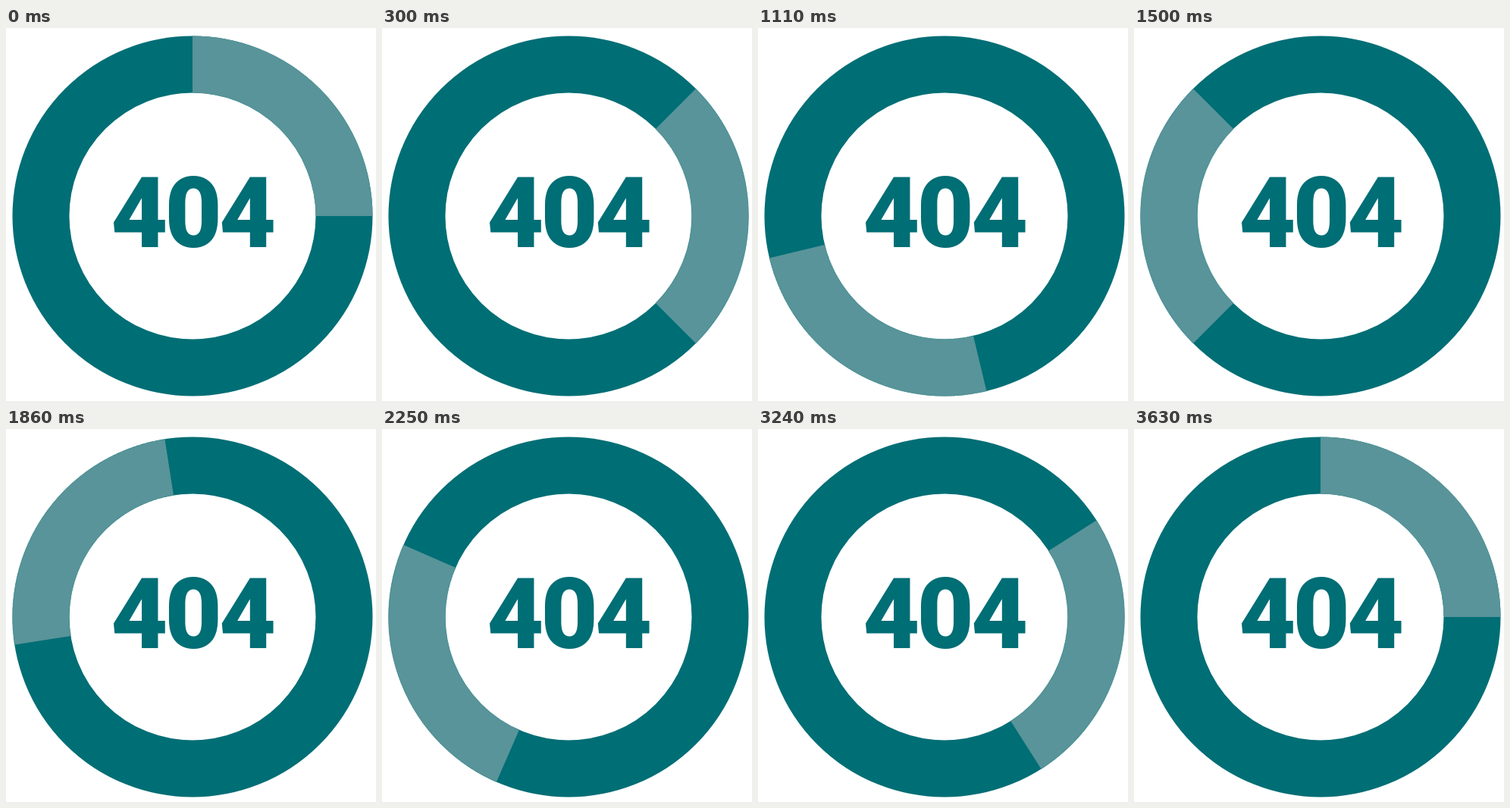
An HTML page that plays this animation: 488x492 px, repeating every 3.66 s.

```html
<!DOCTYPE html>
<html lang="en">
<head>
<meta charset="utf-8">
<title>404</title>
<style>
  html, body { margin: 0; width: 100%; height: 100%; overflow: hidden; background: #fff; }
  svg { display: block; width: 488px; height: 492px; }
  circle { fill: none; stroke: #006e75; stroke-width: 75; }
  .arc {
    stroke: #589499;
    stroke-dasharray: 1 3;
    transform-origin: 246px 248px;
    animation: swing 3660ms -4ms infinite;
  }
  text {
    font: 900 130px Roboto, sans-serif;
    letter-spacing: -4px;
    text-anchor: middle;
    fill: #006e75;
  }
  /* 60 ticks out, 61 ticks back, one tick of rest; 30 ms each */
  @keyframes swing {
    0% { transform: rotate(-90deg); animation-timing-function: steps(60); }
    49.18033% { transform: rotate(180deg); animation-timing-function: steps(61); }
    99.18033%, 100% { transform: rotate(-90deg); }
  }
</style>
</head>
<body>
<svg viewBox="0 0 488 492">
  <circle cx="246" cy="248" r="200"/>
  <circle class="arc" cx="246" cy="248" r="200" pathLength="4"/>
  <text x="245.3" y="289">404</text>
</svg>
</body>
</html>
```
